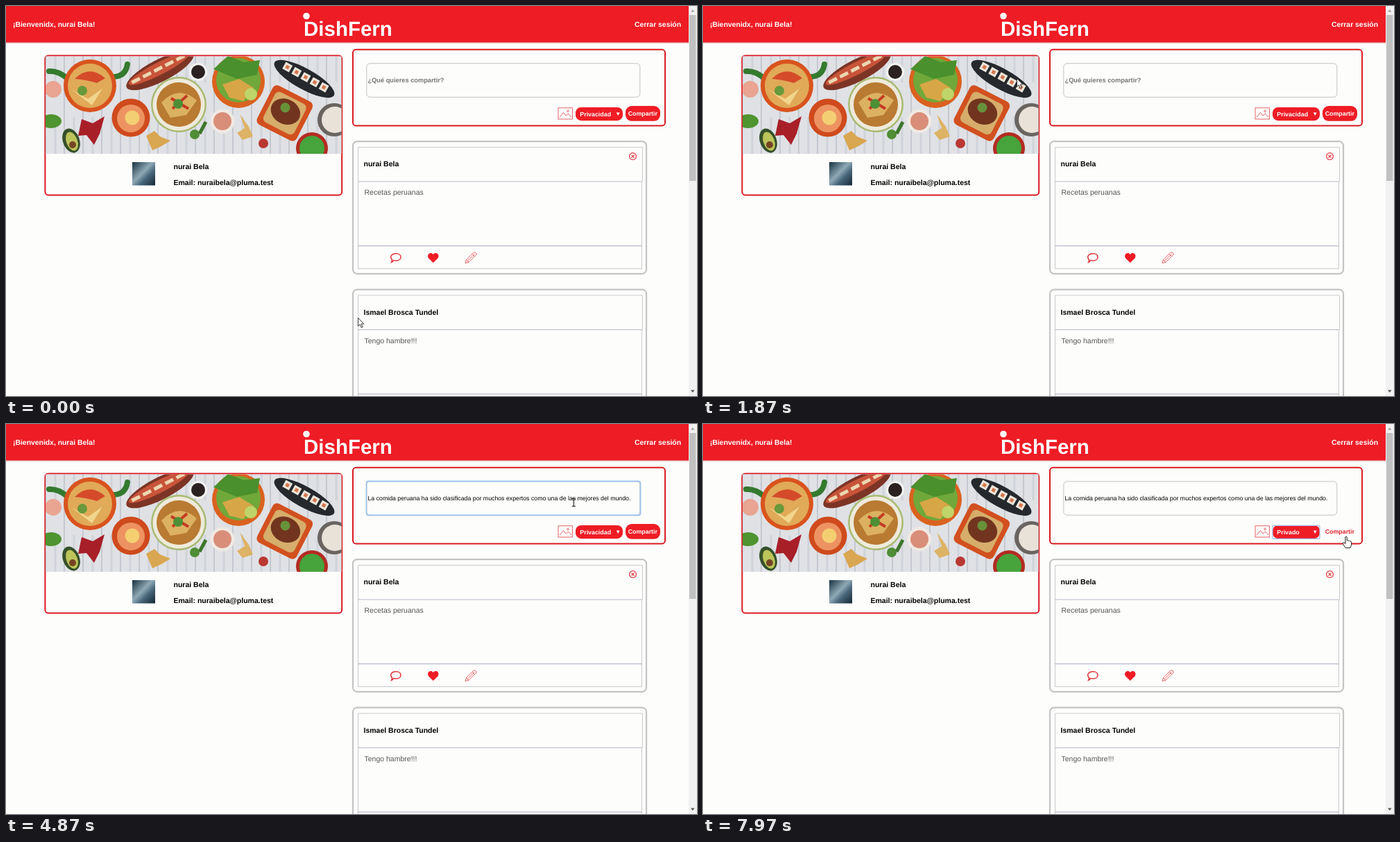
An HTML page that plays this animation: 996 px wide and 562 px high, repeating every 8 s.

```html
<!DOCTYPE html>
<html lang="es">
<head>
<meta charset="utf-8">
<title>DishFern</title>
<style>
html, body { margin: 0; width: 100%; height: 100%; overflow: hidden; background: #fdfdfb; }
svg { display: block; width: 996px; height: 562px; }
text { font-family: "Liberation Sans", Arial, sans-serif; text-rendering: geometricPrecision; font-size: 10.5px; }
.b { font-weight: bold; }
.w { fill: #fff; font-weight: bold; font-size: 10.4px; }
.btn { font-weight: bold; font-size: 8.85px; fill: #fff; }
.redtext { fill: #e0222a; }
.body { fill: #555; }
.red { fill: #ee1c25; }
.card { fill: #fdfdfc; stroke: #d91a22; stroke-width: 2; }
.line { fill: none; stroke: #e0343b; stroke-width: 1.2; }
.thin { stroke-width: .9; opacity: .85; }
.thick { stroke-width: 1.5; }

/* one shared clock: 80 ms = 1% */
[data-t] { animation: 8s step-end infinite; }
#cursor { animation: move 8s linear infinite; }
#arrow { animation-name: arrow; }
#beam { animation-name: beam; }
#hand { animation-name: hand; }
#hint { animation-name: hint; }
#typed { animation-name: typed; }
#ring { animation-name: ring; }
#selHover { animation-name: selHover; animation-timing-function: linear; }
#selRing { animation-name: selRing; }
#before { animation-name: before; }
#after { animation-name: after; }
#shareHover { animation-name: shareHover; }

@keyframes move {
  0%, 10.75% { transform: translate(507px, 449px); }
  15% { transform: translate(412px, 382px); }
  20.4% { transform: translate(444px, 126px); }
  23.3%, 25% { transform: translate(452px, 104px); }
  31%, 52.1% { transform: translate(552px, 108px); }
  57.9%, 60.4% { transform: translate(810px, 108px); }
  64.4% { transform: translate(878px, 149px); }
  66.3% { transform: translate(910px, 156px); }
  68.75%, 80.5% { transform: translate(888px, 152px); }
  83.4%, 97.5% { transform: translate(861.5px, 167px); }
  99.6%, 100% { transform: translate(927px, 162px); }
}
@keyframes arrow {
  0% { opacity: 1; } 29% { opacity: 0; }
  62.7% { opacity: 1; } 64% { opacity: 0; }
  81.3% { opacity: 1; } 98.6%, 100% { opacity: 0; }
}
@keyframes beam { 0% { opacity: 0; } 29% { opacity: 1; } 62.7%, 100% { opacity: 0; } }
@keyframes hand {
  0% { opacity: 0; } 64% { opacity: 1; }
  81.3% { opacity: 0; } 98.6%, 100% { opacity: 1; }
}
@keyframes hint { 0% { opacity: 1; } 48.75%, 100% { opacity: 0; } }
@keyframes typed { 0% { opacity: 0; } 48.75%, 100% { opacity: 1; } }
@keyframes ring { 0% { opacity: 0; } 35% { opacity: 1; } 74.2%, 100% { opacity: 0; } }
@keyframes selHover {
  0%, 63.9% { opacity: 0; } 64%, 65.4% { opacity: 1; } 65.5%, 67.7% { opacity: 0; }
  67.8%, 92.1% { opacity: 1; } 93%, 100% { opacity: 0; }
}
@keyframes selRing { 0% { opacity: 0; } 74.2%, 100% { opacity: 1; } }
@keyframes before { 0% { opacity: 1; } 92.1%, 100% { opacity: 0; } }
@keyframes after { 0% { opacity: 0; } 92.1%, 100% { opacity: 1; } }
@keyframes shareHover {
  0% { opacity: 0; } 65.4% { opacity: 1; } 67.8% { opacity: 0; } 98.6%, 100% { opacity: 1; }
}
</style>
</head>
<body>
<svg viewBox="0 0 996 562">
  <defs>
    <clipPath id="photoBox"><rect x="57" y="72.5" width="426.5" height="140.5"/></clipPath>
    <pattern id="planks" x="58" width="27" height="140" patternUnits="userSpaceOnUse">
      <rect width="27" height="140" fill="#dfe1e5"/>
      <path d="M13 20V110" stroke="#d0d3d9" stroke-width="3"/>
      <path d="M26 0V140" stroke="#b3b8c0" stroke-width="1.2"/>
    </pattern>
    <linearGradient id="avatar" x2="1" y2="1">
      <stop stop-color="#16303f"/><stop offset=".45" stop-color="#8fa9b6"/>
      <stop offset=".65" stop-color="#48667a"/><stop offset="1" stop-color="#142733"/>
    </linearGradient>
    <linearGradient id="shade" x2="0" y2="1">
      <stop stop-color="#b66" stop-opacity=".5"/><stop offset="1" stop-color="#b66" stop-opacity="0"/>
    </linearGradient>
    <g id="post">
      <rect x="500" y="195.2" width="423" height="190.6" rx="6" fill="#fdfdfc" stroke="#c4c4c4" stroke-width="2.2"/>
      <path d="M507.5 379V203.5H917.5V253M916.5 253V378.5H507" fill="none" stroke="#cacaca"/>
      <path d="M507 253H917M507 345.7H917" stroke="#b9b9cd" stroke-width="1.2"/>
      <path class="line thick" d="M558.6 366.4Q557.6 368.6 555.6 369.2Q556.6 367.4 556.4 365.4C552.5 361.5 555.8 356.8 562 356.8C571.4 356.8 571.4 367 562 367Q560.2 367 558.6 366.4Z"/>
      <path class="red" d="M615.8 370L609.4 363.8C605.3 358.6 611.8 352.8 615.8 358C619.8 352.8 626.3 358.6 622.2 363.8Z"/>
      <path class="line thin" d="M662 370.5L663.4 365.8L673.8 355.4Q675.8 354.2 677.3 355.8Q678.8 357.5 677.4 359L667 369.2ZM663.4 365.8L667 369.2M672 357.3L675.5 360.8M665.2 367.4L675.5 357.3"/>
    </g>
  </defs>

  <rect width="996" height="562" fill="#fdfdfb"/>
  <rect y="52" width="984" height="3" fill="url(#shade)"/>
  <rect class="red" width="984" height="52.5"/>
  <text class="w" x="10" y="30">¡Bienvenidx, nurai Bela!</text>
  <text class="w" x="906" y="30">Cerrar sesión</text>
  <circle cx="433" cy="14.5" r="4.8" fill="#fff"/>
  <text class="w" x="429" y="42.5" style="font-size:29.5px">DishFern</text>

  <!-- scrollbar -->
  <rect x="984" width="12" height="562" fill="#f1f1f1"/>
  <rect x="985" y="13" width="9.5" height="239" fill="#c1c1c1"/>
  <path d="M987 8.5L989.8 5L992.6 8.5Z" fill="#a3a3a3"/>
  <path d="M987 553.5L989.8 557L992.6 553.5Z" fill="#505050"/>

  <!-- profile -->
  <rect class="card" x="56.4" y="71.4" width="427.8" height="201" rx="4.5"/>
  <g clip-path="url(#photoBox)">
    <rect x="57" y="72" width="427" height="141" fill="url(#planks)"/>
    <path d="M62 94Q75 93 88 104M152 102Q172 103 175 84" fill="none" stroke="#347a2e" stroke-width="8" stroke-linecap="round"/>
    <circle cx="68" cy="120" r="12" fill="#e9a492"/>
    <ellipse cx="65" cy="166" rx="15" ry="10" fill="#4e942f"/>
    <circle cx="121" cy="115" r="38" fill="#d9531e"/>
    <circle cx="121" cy="115" r="32" fill="#e0aa58"/>
    <path d="M99 105Q120 84 143 104L131 111Q114 106 99 105Z" fill="#d54b2a"/>
    <path d="M94 120L118 134L139 119L124 143Z" fill="#f2d58d"/>
    <circle cx="110" cy="122" r="7" fill="#68993a"/>
    <ellipse cx="94" cy="194" rx="12" ry="18" transform="rotate(-20 94 194)" fill="#35502a"/>
    <ellipse cx="95" cy="195" rx="8" ry="14" transform="rotate(-20 95 195)" fill="#bcc45a"/>
    <circle cx="96" cy="200" r="5" fill="#754523"/>
    <path d="M109 163L125 169L142 159L135 184L127 200L116 186L104 187Z" fill="#a81f28"/>
    <g transform="rotate(-27 222 93)">
      <ellipse cx="222" cy="93" rx="54" ry="16" fill="#7c3425"/>
      <ellipse cx="222" cy="90" rx="49" ry="9" fill="#c8543a"/>
      <path d="M178 90H266" stroke="#ecd7b2" stroke-width="5" stroke-dasharray="13 5"/>
    </g>
    <circle cx="277" cy="95" r="13" fill="#f3f3f1"/>
    <circle cx="277" cy="95" r="10" fill="#2a2120"/>
    <circle cx="180" cy="161" r="27.5" fill="#cf4a1d"/>
    <circle cx="180" cy="162" r="20" fill="#ed9362"/>
    <circle cx="182" cy="161" r="10.5" fill="#f4cf72"/>
    <path d="M202 187L214 180L222 188L237 194L224 202L211 208Z" fill="#d9a651"/>
    <circle cx="249" cy="142" r="40" fill="#a8ba72"/>
    <circle cx="249" cy="142" r="37.5" fill="#eeeadb"/>
    <circle cx="249" cy="142" r="32" fill="#b97a32"/>
    <path d="M224 139Q249 113 275 136L260 157L237 161Z" fill="#dcb161"/>
    <path d="M238 133L263 148M261 129L240 148" stroke="#c43a23" stroke-width="4"/>
    <circle cx="248" cy="141" r="7" fill="#4d8f35"/>
    <circle cx="272" cy="185" r="7" fill="#4f8d36"/>
    <path d="M279 184L288 167" stroke="#3e752c" stroke-width="5"/>
    <circle cx="335" cy="109" r="38" fill="#da6220"/>
    <circle cx="335" cy="107" r="32" fill="#71a83a"/>
    <path d="M299 91L320 72L343 81L366 78L362 99L333 105Z" fill="#4a902d"/>
    <path d="M312 113L336 105L357 118L342 137L322 132Z" fill="#d7a646"/>
    <circle cx="353" cy="127" r="9" fill="#bfd569"/>
    <circle cx="312" cy="166" r="17.5" fill="#f0e9e3"/>
    <circle cx="312" cy="166" r="13" fill="#d98e79"/>
    <path d="M337 156L350 174L356 188L341 193L333 183L344 176Z" fill="#ddb365"/>
    <g transform="rotate(27 402 154)">
      <rect x="370" y="123" width="64" height="63" rx="7" fill="#d2501f"/>
      <rect x="377" y="130" width="50" height="49" rx="7" fill="#d6ad6b"/>
      <ellipse cx="402" cy="152" rx="22" ry="18" fill="#71351f"/>
      <circle cx="399" cy="147" r="7" fill="#68923a"/>
    </g>
    <g transform="rotate(29 430 105)">
      <ellipse cx="430" cy="105" rx="49" ry="15" fill="#25292d"/>
      <path d="M395 102H466" stroke="#ece5da" stroke-width="11" stroke-dasharray="11 4"/>
      <path d="M398 102H465" stroke="#d6754c" stroke-width="5" stroke-dasharray="5 10"/>
    </g>
    <circle cx="473" cy="164" r="24" fill="#696460"/>
    <circle cx="474" cy="164" r="19" fill="#e8e2d9"/>
    <circle cx="441" cy="205" r="23" fill="#b32c22"/>
    <circle cx="441" cy="205" r="18" fill="#47a33c"/>
    <circle cx="371" cy="198" r="7" fill="#b93731"/>
  </g>
  <rect x="182" y="225" width="33" height="33.5" fill="url(#avatar)"/>
  <text class="b" x="241.5" y="235">nurai Bela</text>
  <text class="b" x="241.5" y="257.7">Email: nuraibela@pluma.test</text>

  <!-- share form -->
  <rect class="card" x="500" y="62.8" width="450" height="109.6" rx="4.5"/>
  <rect x="519.8" y="82.8" width="394" height="48.5" rx="5" fill="#fdfdfc" stroke="#c2c2c2"/>
  <rect id="ring" data-t x="519.5" y="82.5" width="395" height="49" rx="3" fill="none" stroke="#a0c4ee" stroke-width="1.8"/>
  <text id="hint" data-t class="b" x="521.5" y="110" fill="#757575" style="font-size:9.25px">¿Qué quieres compartir?</text>
  <text id="typed" data-t x="521.5" y="109.7" style="font-size:8.75px">La comida peruana ha sido clasificada por muchos expertos como una de las mejores del mundo.</text>
  <g class="line thin">
    <rect x="796" y="146.8" width="20.4" height="16.2"/>
    <path d="M798 160L803.5 153.5L807 158L810.5 155L815 160"/>
    <circle cx="810" cy="151.5" r="1.3"/>
  </g>

  <rect class="red" x="821" y="146" width="68" height="19.2" rx="8"/>
  <path d="M879.7 153.5H884.7L882.2 158Z" fill="#fff"/>
  <text id="before" data-t class="btn" x="827.3" y="158.6">Privacidad</text>
  <text id="after" data-t class="btn" x="827.3" y="158.6">Privado</text>
  <g id="selHover" data-t>
    <rect x="820.5" y="145.5" width="69" height="20.2" fill="#fdfdfc"/>
    <path class="redtext" d="M879.7 153.5H884.7L882.2 158Z"/>
    <text class="btn redtext" x="827.3" y="158.6">Privacidad</text>
  </g>
  <rect id="selRing" data-t x="821" y="146.3" width="68" height="19" rx="2" fill="none" stroke="#a3bae6" stroke-width="1.2"/>

  <rect class="red" x="893" y="144" width="50" height="21.8" rx="9"/>
  <text class="btn" x="896.7" y="158.3">Compartir</text>
  <g id="shareHover" data-t>
    <rect x="892" y="143" width="52" height="24" fill="#fdfdfc"/>
    <text class="btn redtext" x="896.7" y="158.3">Compartir</text>
  </g>

  <!-- posts -->
  <use href="#post"/>
  <g class="line">
    <circle cx="903.5" cy="216.6" r="4.9"/>
    <path d="M901.5 214.6L905.5 218.6M905.5 214.6L901.5 218.6"/>
  </g>
  <text class="b" x="515.5" y="231">nurai Bela</text>
  <text class="body" x="516.5" y="272.2">Recetas peruanas</text>
  <use href="#post" y="213.5"/>
  <text class="b" x="515.5" y="444.7">Ismael Brosca Tundel</text>
  <text class="body" x="516.5" y="486">Tengo hambre!!!</text>

  <g id="cursor">
    <path id="arrow" data-t d="M.5 .5V12.3L3.2 9.8L5.2 14.5L7.2 13.6L5.2 9.1H8.8Z" fill="#fff" stroke="#222" stroke-width=".9"/>
    <path id="beam" data-t d="M-2.5 -5.5H-.6L0 -5L.6 -5.5H2.5M0 -5V5M-2.5 5.5H-.6L0 5L.6 5.5H2.5" fill="none" stroke="#111" stroke-width="1.2"/>
    <path id="hand" data-t d="M-1.2 10.5V1Q0 -1 1.2 1V6Q2.4 4.8 3.4 6.4Q4.6 5.4 5.5 7Q7.4 6.4 7.6 8.4V12L6 16.5H-1L-4.8 10.3Q-4.4 7.8 -2.6 9.2Z" fill="#fff" stroke="#222" stroke-width="1"/>
  </g>
</svg>
</body>
</html>
```
